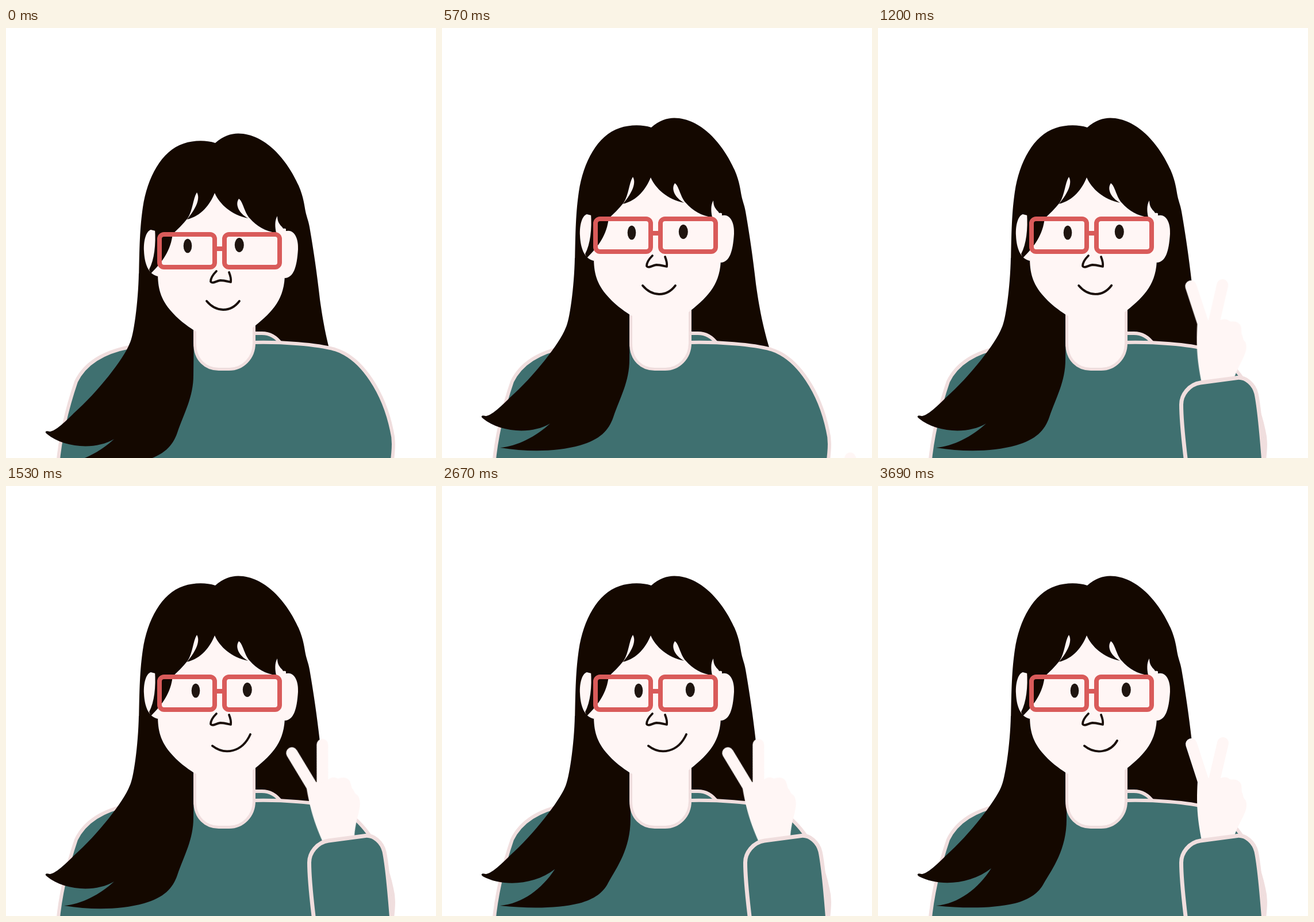
Write an HTML page that moves like this. It is 748 by 748 pixels and loops after 6.03 s.

```html
<!DOCTYPE html>
<html lang="en">
<head>
<meta charset="utf-8">
<title>Peace sign portrait</title>
<style>
  html, body { margin: 0; width: 100%; height: 100%; overflow: hidden; background: #fff; }
  svg { display: block; width: 100%; height: 100%; }

  .hair { fill: #140800; }
  .skin { fill: #fff6f5; }
  .cloth { fill: #3f7070; stroke: #f0dede; stroke-width: 6; }
  .neck { fill: #fff6f5; stroke: #f0dede; stroke-width: 5; }
  .finger { fill: none; stroke: #fff6f5; stroke-width: 20; stroke-linecap: round; }
  .frame { fill: none; stroke: #d95b5a; stroke-width: 8; }
  .line { fill: none; stroke: #1a0f0a; stroke-width: 3.8; stroke-linecap: round; stroke-linejoin: round; }
  .eye { fill: #1f1510; transform-box: fill-box; transform-origin: center; }
  .hand { transform-origin: 588px 663px; }
  .sleeve { stroke-width: 7; }

  /* One shared 6030 ms clock */
  .lift, .lock, .gaze, .eye, .mouth, .arm, .hand, .sleeve {
    animation: 6030ms ease-in-out infinite;
  }
  .lift { animation-name: lift; }
  .lock { animation-name: sway; }
  .gaze { animation-name: gaze; }
  .eye { animation-name: blink; }
  .mouth { animation-name: smile; }
  .arm { animation-name: raise; }
  .hand { animation-name: wave; }
  .sleeve { animation-name: sharpen; animation-timing-function: linear; }

  @keyframes lift {
    0%, 2.488% { transform: translateY(27px); }
    6.965%, 100% { transform: none; }
  }
  @keyframes gaze {
    0%, 2.488% { transform: translate(-14px, -4px); }
    6.965%, 28.358% { transform: translate(0, 0); }
    35.821%, 100% { transform: translate(12px, 0); }
  }
  @keyframes blink {
    0%, 11.94% { transform: scale(1, 1); }
    14.428% { transform: scale(1.03, .48); }
    16.915%, 100% { transform: scale(1, 1); }
  }
  @keyframes raise {
    0%, 9.452% { transform: translate(200px, 360px); }
    9.453% { transform: translate(166px, 301px); animation-timing-function: cubic-bezier(.3, 1, .63, 1); }
    19.403%, 100% { transform: translate(0, 0); }
  }
  @keyframes sharpen {
    0%, 9.453% { filter: blur(6px); }
    19.403%, 100% { filter: blur(0); }
  }
  @keyframes wave {
    0%, 19.403% { transform: rotate(0deg); }
    25.373%, 52.736% { transform: rotate(-13.2deg); }
    61.194%, 100% { transform: rotate(0deg); }
  }
  @keyframes smile {
    0%, 19.403% { d: path("M349 448 C365 467 390 469 406 448"); }
    25.373%, 52.736% { d: path("M359 452 C381 469 411 463 425 432"); }
    61.194%, 100% { d: path("M359 452 C379 468 405 463 416 443"); }
  }
  @keyframes sway {
    0%, 37.811% {
      d: path("M231 400 C230 450 222 510 215 522 C205 548 160 606 118 643 C101 660 86 674 76 675 C70 673 66 675 71 679 C100 703 155 708 188 688 C165 710 130 728 101 730 C150 738 200 737 240 726 C275 716 290 700 298 677 C310 642 326 615 326 577 L328 400 Z");
    }
    45.771%, 100% {
      d: path("M231 400 C230 450 221 510 214 524 C204 548 160 606 118 643 C101 660 86 674 76 675 C70 673 66 675 71 679 C105 697 160 694 197 665 C175 700 140 727 101 730 C150 735 200 735 238 726 C265 719 280 707 288 692 C304 665 328 632 328 580 L328 400 Z");
    }
  }
</style>
</head>
<body>
<svg viewBox="0 0 748 748">
  <!-- Crown and the hair behind the shoulder -->
  <g class="lift">
    <path class="hair" d="M364 173 C378 161 391 156.500 404 156.500 C451 157 489 202 509 247 C518 268 519 282 521 292 C523 302 527 310 529 325 C535 360 541 400 546 445 C551 480 558 525 577 580 L430 580 L430 450 L231 420 C232 350 233 320 238 285 C246 233 270 187 309 174 C327 168 348 168 364 173 Z"/>
  </g>

  <path class="cloth" d="M425 531 H445 C458 531 470 537 479 550 L425 560"/>
  <path class="cloth" d="M90 760 C94 715 105 665 122 615 C137 584 168 564 215 555 L432 547 C480 546 540 550 572 559 C621 574 658 637 671 700 C675 715 675 728 671 760"/>

  <g class="lift">
    <path class="hair lock" d="M231 400 C230 450 222 510 215 522 C205 548 160 606 118 643 C101 660 86 674 76 675 C70 673 66 675 71 679 C100 703 155 708 188 688 C165 710 130 728 101 730 C150 738 200 737 240 726 C275 716 290 700 298 677 C310 642 326 615 326 577 L328 400 Z"/>
  </g>
  <path class="neck" d="M328.500 472 V548 C328.500 578 348 593.500 370 593.500 H388 C412 593.500 431.500 574 431.500 548 V472 Z"/>

  <!-- Face -->
  <g class="lift">
    <path class="skin" d="M252 324 C244 326 239 342 240 361 C241 382 247 401 264 405 L272 380 L260 326 Z"/>
    <path class="skin" d="M480 326 L489 326 C503 324 509 342 508 358 C506 390 500 407 485 408 L474 400 Z"/>
    <path class="skin" d="M264 395 C264 420 266 440 285 463 C299 480 315 491 327 499 C350 512 410 512 432 492 C465 466 485 443 485 400 L487 323 C485 320 482 324 481 320 C476 315 472 310 472 300 C467 308 468 320 470 329 C452 327 436 318 424 304 C415 295 412 274 405 270 C398 280 405 295 421 304 C392 298 372 280 363 260 C355 280 340 300 315 306 C332 285 338 269 332 259 C325 270 325 290 316 304 C308 314 298 324 288 333 Z"/>
    <path class="hair" d="M259 322 C261 350 258 376 249 393 L252 400 C272 380 287 360 290 330 Z"/>

    <g class="gaze">
      <ellipse class="eye" cx="330" cy="356" rx="7.300" ry="12.300"/>
      <ellipse class="eye" cx="419.800" cy="354.500" rx="8" ry="12.500"/>
    </g>
    <g class="frame">
      <rect x="267" y="332" width="96" height="57" rx="8"/>
      <rect x="380" y="332" width="96" height="57" rx="8"/>
      <path d="M365 357 H378"/>
    </g>
    <path class="line" d="M366 396 C361 401 356 408 356 414 C359 419 365 413 373 412 C380 412 386 414 391 415 C392 409 390 403 388 398"/>
    <path class="line mouth" d="M349 448 C365 467 390 469 406 448"/>
  </g>

  <!-- Raised arm -->
  <g class="arm">
    <g class="hand">
      <path class="finger" d="M545 449 L568 520 M600 447 L583 520"/>
      <path class="skin" d="M556 513 C553 560 557 590 566 630 L614 630 C620 602 628 590 636 573 C643 560 642 548 638 545 C634 540 636 537 633 533 C632 527 634 518 628 514 C622 508 615 512 612 510 C606 504 596 506 590 512 L575 508 Z"/>
    </g>
    <path class="cloth sleeve" d="M537.500 770 C532 720 527.500 690 527.500 655 C527.500 638 541 620 561 617 L625 608.500 C640 607 654 620 658 636 C664 665 668 715 672 770"/>
  </g>
</svg>
</body>
</html>
```
